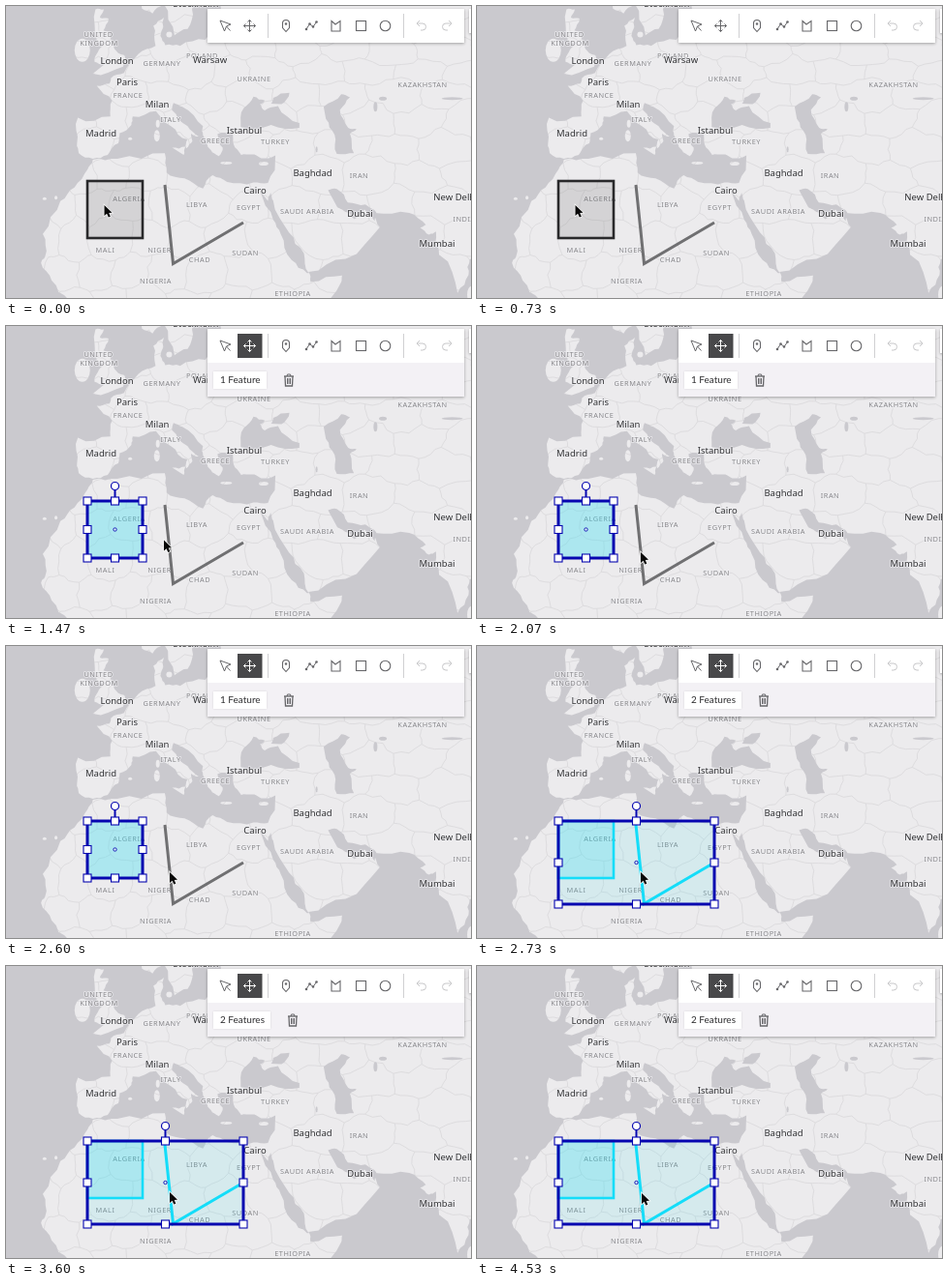
These frames come from a looping animation (480 px wide and 302 px high, 4590 ms). An HTML page with a canvas:

```html
<!DOCTYPE html>
<html lang="en">
<head>
<meta charset="utf-8">
<title>Map sketch selection</title>
<style>
html, body { margin: 0; width: 100%; height: 100%; overflow: hidden; background: #cac9ce; }
canvas { display: block; width: 480px; height: 302px; }
</style>
</head>
<body>
<canvas id="stage" width="480" height="302"></canvas>
<script>
const W = 480, H = 302, LOOP = 4590;
const LAND = '#ecebed', WATER = '#cac9ce', BORDER = '#d9d8db';
const NAVY = '#0606b0', CYAN = '#0fdcfa', INK = '#67676a';
const PICKED = 1000, ADDED = 2670;

// Key points of the coasts, lon and lat; roughen() adds the detail
const atlantic = [30,60, 23.5,59, 24.3,57.3, 21.6,57.4, 20,54.8, 14.3,54, 10.9,54.1, 9.8,55.3, 10.6,57.6, 8.2,56.6,
  8.7,54, 4.8,52.9, 1.5,50.2, -1.5,49.4, -1.8,48.6, -4.7,48.3, -1.2,46, -1.6,43.4, -9,43.2, -9.2,38.8, -8.8,37, -5.6,36];
const mediterranean = [-2.2,36.7, .2,38.8, .5,40.6, 3.2,42, 3.5,43.4, 8.8,44.3, 12.2,41.8, 16,39.5, 15.7,37.9, 17.1,39.2,
  16.8,40.5, 18.5,40, 16,41.8, 12.4,44.5, 12.8,45.6, 14.8,45, 19.5,41.8, 19.5,40.2, 21.3,37.6, 23.1,36.5, 24,38,
  22.8,40.4, 26.3,40.6, 26.5,38.6, 28.2,36.7, 30.6,36.8, 32.8,36.1, 36,36.6, 34.3,31.4, 31,31.5, 25,31.6, 21.7,32.9,
  19.5,30.3, 15.3,32.3, 11.2,33.4, 10.8,37, 0,36, -5.6,35.8];
const south = [-6.8,34, -9.8,30.5, -13,27.8, -17,21, -16.5,16, -17.4,14.7, -15,10.8, -11,6.3, -8,3, 46,3, 51,10.4,
  51.2,11.9, 44,10.5, 43.5,12.7, 52,15.6, 59.8,22.4, 58.6,25.4, 66.5,25.4, 70.3,22.9, 69,22.3, 71,20.8, 72.6,21.5,
  73.3,16.5, 77.5,8, 80,12, 80.3,15.5, 90,20, 90,65];
const britain = [-5.6,50.1, 1.3,51.1, 1.7,52.6, .2,53, -2,55.8, -3.2,56, -2,57.5, -4,57.6, -3.1,58.6, -5,58.6, -4.8,54.9,
  -3,54.2, -4.4,53.2, -5.2,51.8, -3,51.4];
const sweden = [5,62, 5.6,58.7, 8,58.1, 10.5,59.3, 13,55.4, 16,56.2, 17,58.6, 19,62];
const sicily = [12.5,38, 15.5,38.2, 15.1,36.7];
const blackSea = [28.1,41.6, 28.8,44.8, 31,46.6, 33.6,46, 32.5,45.4, 33.6,44.4, 36.6,45.1, 41.5,42.3, 41.5,41.5, 35,42, 31.3,41.2];
const azov = [35,45.5, 35.5,46.4, 39.2,47.2, 37.4,45.4];
const caspian = [47,45, 51,47, 53,46.5, 50.7,44.5, 52.6,41.5, 54.5,41.3, 53,40.5, 53.9,37, 50,36.9, 49.5,40.3, 47.5,43];
const redSea = [32.5,29.9, 35.5,24, 37.2,21, 39.7,15.3, 43.2,12.4, 43.6,12.4, 42.5,16.8, 39.1,21.3, 35.5,27.9, 34.9,29.5, 34.3,27.8];
const gulf = [48,30, 50,30.2, 52.5,27.5, 56.5,27.1, 59,25.5, 58.6,23.7, 56.3,26.1, 54,24.1, 51.2,26.1, 50.1,26.6];

// Small ovals: lon, lat, radii in pixels
const isles = [[-8, 53.4, 8, 12], [9, 40.1, 3, 6], [9.2, 42.2, 2, 4], [24.8, 35.2, 6, 1.5], [33.3, 35.1, 5, 2],
  [2.9, 39.6, 2, 1.5], [-16.6, 28.3, 2, 1.5], [-14, 28.5, 1.5, 2], [80.8, 7.6, 5, 9], [11.8, 55.5, 3, 3]];
const lakes = [[28, 40.7, 5, 1.5], [58.8, 45, 2, 5], [60.5, 46.3, 4, 2], [76.3, 46.3, 11, 1.5], [45.4, 37.7, 1, 3]];

const countries = [
  ['UNITED', 95.5, 30], ['KINGDOM', 96, 38.5], ['GERMANY', 161, 60], ['POLAND', 202.5, 52], ['FRANCE', 126, 93],
  ['UKRAINE', 256, 76], ['KAZAKHSTAN', 430, 82], ['ITALY', 170, 118], ['GREECE', 216, 140], ['TURKEY', 278, 140.5],
  ['IRAN', 364.5, 176], ['ALGERIA', 127, 200], ['LIBYA', 197, 206], ['EGYPT', 250.5, 208.5], ['SAUDI ARABIA', 311, 213],
  ['MALI', 102.5, 253], ['NIGER', 158.5, 252.5], ['CHAD', 200, 262.5], ['SUDAN', 247, 256], ['NIGERIA', 154.5, 285],
  ['ETHIOPIA', 296, 298], ['INDIA', 473, 221]
];
const cities = [
  ['London', 114.5, 57], ['Paris', 125, 79.5], ['Milan', 156, 102], ['Madrid', 98, 132.5], ['Warsaw', 210.5, 56],
  ['Istanbul', 246, 129.5], ['Baghdad', 316.5, 173.5], ['Cairo', 257, 191], ['Dubai', 365.5, 215.5], ['Mumbai', 445, 246],
  ['New Delhi', 464, 198], ['Stockholm', 196, -2]
];

const stage = document.getElementById('stage').getContext('2d');
let g = stage;

let seed = 7;
function jitter(size) {
  seed = seed * 16807 % 2147483647;
  return (seed / 2147483647 - 0.5) * 2 * size;
}
function project(lon, lat) {
  return [115 + 4.53 * lon, 333 - 259.6 * Math.log(Math.tan(Math.PI / 4 + lat * Math.PI / 360))];
}
function coast(flat) {
  const pts = [];
  for (let i = 0; i < flat.length; i += 2) pts.push(project(flat[i], flat[i + 1]));
  return roughen(pts, 0.13, 2);
}
// Moves the middle of every segment sideways, then repeats
function roughen(pts, amount, depth) {
  if (!depth) return pts;
  const out = [pts[0]];
  for (let i = 1; i < pts.length; i++) {
    const [x0, y0] = pts[i - 1], [x1, y1] = pts[i], k = jitter(amount);
    out.push([(x0 + x1) / 2 - (y1 - y0) * k, (y0 + y1) / 2 + (x1 - x0) * k], pts[i]);
  }
  return roughen(out, amount, depth - 1);
}

function path(pts, closed) {
  g.beginPath();
  for (const p of pts) g.lineTo(...p);
  if (closed) g.closePath();
}
function line(pts, color, width = 1, closed = false) {
  path(pts, closed);
  g.strokeStyle = color;
  g.lineWidth = width;
  g.stroke();
}
function box(x, y, w, h, fill, stroke, width = 1) {
  if (fill) { g.fillStyle = fill; g.fillRect(x, y, w, h); }
  if (stroke) { g.strokeStyle = stroke; g.lineWidth = width; g.strokeRect(x, y, w, h); }
}
function circle(x, y, r, fill, stroke, width = 1) {
  g.beginPath();
  g.arc(x, y, r, 0, 7);
  if (fill) { g.fillStyle = fill; g.fill(); }
  if (stroke) { g.strokeStyle = stroke; g.lineWidth = width; g.stroke(); }
}
function fillAreas(areas, ovals) {
  g.fillStyle = LAND;
  for (const a of areas) { path(coast(a), true); g.fill(); }
  for (const [lon, lat, rx, ry] of ovals) {
    g.beginPath();
    g.ellipse(...project(lon, lat), rx, ry, 0, 0, 7);
    g.fill();
  }
}

// A loose honeycomb whose cells widen to the south and east
function paintBorders() {
  const nodes = [];
  for (let r = 0; r < 12; r++) {
    nodes.push([]);
    for (let c = 0; c < 22; c++) {
      const sag = (r + c) % 2 ? 4 : -4;
      nodes[r].push([40 + 16 * c + 0.3 * c * c + jitter(5), 12 + 20 * r + 0.8 * r * r + sag + jitter(5)]);
    }
  }
  for (let r = 0; r < 11; r++)
    for (let c = 0; c < 21; c++) {
      line(roughen([nodes[r][c], nodes[r][c + 1]], 0.15, 2), BORDER, 0.8);
      if ((r + c) % 2) line(roughen([nodes[r][c], nodes[r + 1][c]], 0.15, 2), BORDER, 0.8);
    }
}

function paintMap() {
  const sheet = document.createElement('canvas');
  sheet.width = W; sheet.height = H;
  g = sheet.getContext('2d');
  g.lineJoin = 'round';
  fillAreas([[...atlantic, ...mediterranean, ...south], britain, sweden, sicily], isles);
  g.globalCompositeOperation = 'source-atop';
  paintBorders();
  g.globalCompositeOperation = 'destination-out';
  fillAreas([blackSea, azov, caspian, redSea, gulf], lakes);
  g.globalCompositeOperation = 'destination-over';
  box(0, 0, W, H, WATER);
  g.globalCompositeOperation = 'source-over';

  g.textAlign = 'center';
  g.textBaseline = 'middle';
  g.font = '7.4px "Noto Sans", sans-serif';
  g.letterSpacing = '0.5px';
  for (const place of countries) label(...place, '#88878a');
  g.font = '9.5px "Noto Sans", sans-serif';
  g.letterSpacing = '0px';
  for (const place of cities) label(...place, '#303032');
  g = stage;
  return sheet;
}
function label(text, x, y, color) {
  g.strokeStyle = 'rgba(240,239,242,.65)';
  g.lineWidth = 2;
  g.strokeText(text, x, y);
  g.fillStyle = color;
  g.fillText(text, x, y);
}

const vee = [[164, 185], [172.5, 266.5], [245, 224]];

function frame(x0, y0, x1, y1, fill) {
  const mx = (x0 + x1) / 2, my = (y0 + y1) / 2;
  box(x0, y0, x1 - x0, y1 - y0, fill, NAVY, 3);
  line([[mx, y0], [mx, 169]], NAVY, 2);
  circle(mx, 165.5, 4, '#fff', NAVY, 1.2);
  circle(mx, my, 1.7, '#d8f2f8', NAVY, 0.9);
  for (const x of [x0, mx, x1])
    for (const y of [y0, my, y1])
      if (x !== mx || y !== my) box(x - 4, y - 4, 8, 8, '#fff', NAVY, 1.1);
}

function drawShapes(t) {
  if (t < ADDED) line(vee, '#707072', 3);
  if (t < PICKED) {
    box(84, 181, 57, 59, 'rgba(90,90,90,.16)', '#29292b', 2.6);
  } else if (t < ADDED) {
    frame(84, 181, 141, 240, 'rgba(60,222,240,.36)');
  } else {
    box(84, 181, 57, 59, 'rgba(0,218,245,.2)', CYAN, 2.6);
    line(vee, CYAN, 3);
    frame(84, 181, 245, 267, 'rgba(60,220,235,.13)');
  }
}

function moveIcon(color) {
  line([[245.5, 20.5], [257.5, 20.5]], color);
  line([[251.5, 14.5], [251.5, 26.5]], color);
  for (const [dx, dy] of [[1, 0], [-1, 0], [0, 1], [0, -1]]) {
    const x = 251.5 + dx * 4, y = 20.5 + dy * 4;
    line([[x + dy * 2, y + dx * 2], [x + dx * 2, y + dy * 2], [x - dy * 2, y - dx * 2]], color);
  }
}
function pinIcon() {
  g.beginPath();
  g.arc(289, 18, 3.5, Math.PI, 0);
  g.lineTo(292.5, 22.5);
  g.lineTo(289, 26.5);
  g.lineTo(285.5, 22.5);
  g.closePath();
  g.strokeStyle = INK;
  g.lineWidth = 1.1;
  g.stroke();
  circle(289, 18.5, 1.2, INK);
}
function turnIcon(x, dir) {
  g.save();
  g.translate(x, 20);
  g.scale(dir, 1);
  line([[-2, -5], [-5, -2], [-2, 1]], '#c8c8ca');
  g.beginPath();
  g.moveTo(-5, -2);
  g.lineTo(1, -2);
  g.arc(1, 1.5, 3.5, -Math.PI / 2, Math.PI / 2);
  g.lineTo(-1, 5);
  g.stroke();
  g.restore();
}
function trashIcon(x) {
  line([[x - 5, 52], [x + 5, 52]], INK, 1.3);
  line([[x - 2, 52], [x - 1.5, 50], [x + 1.5, 50], [x + 2, 52]], INK);
  line([[x - 4, 52], [x - 3.5, 62], [x + 3.5, 62], [x + 4, 52]], INK, 1.3);
  for (const dx of [-1.5, 0, 1.5]) line([[x + dx, 54], [x + dx, 60]], INK);
}

const fade = (t, start) => Math.min(1, Math.max(0, (t - start) / 200));

function drawToolbar(t) {
  const open = t >= PICKED;
  g.save();
  g.shadowColor = 'rgba(0,0,0,.32)';
  g.shadowBlur = 3;
  g.shadowOffsetY = 1;
  box(208, 3, 265, open ? 70 : 35, '#fff');
  box(478, 3, 10, 25, '#fff');
  g.restore();

  line([[221, 15], [232, 19], [227.5, 21], [225.5, 26]], INK, 1, true);
  line([[227.5, 21], [231.5, 25.5]], INK);
  if (open) {
    g.globalAlpha = fade(t, 1030);
    box(239, 8, 25.5, 25, '#48484a');
    moveIcon('#fff');
    g.globalAlpha = 1;
  } else {
    moveIcon(INK);
  }
  for (const x of [270.5, 410.5]) line([[x, 8], [x, 33]], '#d0d0d2');

  pinIcon();
  const zig = [[310, 24], [313.5, 18.5], [317, 21.5], [320.5, 16.5]];
  line(zig, INK);
  for (const [x, y] of zig) circle(x, y, 1.3, INK);
  line([[336, 15.5], [340, 19], [345, 15.5], [345, 26], [336, 26]], INK, 1.1, true);
  box(361.5, 15.5, 10, 10, null, INK, 1.1);
  circle(391.5, 20.5, 5.3, null, INK, 1.1);
  turnIcon(429, 1);
  turnIcon(455, -1);
  if (open) drawActions(t);
}

function drawActions(t) {
  const two = t >= ADDED, grow = two ? 4 : 0;
  g.save();
  g.globalAlpha = fade(t, 1070);
  box(208, 38, 265, 35, '#f3f1f5');
  g.save();
  g.shadowColor = 'rgba(0,0,0,.12)';
  g.shadowBlur = 2;
  box(214, 47, 55 + grow, 18, '#fff');
  g.restore();
  g.font = '10px Lato, sans-serif';
  g.textBaseline = 'middle';
  g.fillStyle = '#2e2e30';
  g.fillText(two ? '2 Features' : '1 Feature', 221, 56);
  trashIcon(292 + grow);
  g.restore();
}

// Cursor stops: time, x, y
const stops = [[0, 101.5, 206], [1130, 101.5, 206], [1470, 163, 221.5], [1670, 169, 234], [4450, 169, 234], [4530, 170, 235], [LOOP, 170, 235]];
function cursorAt(t) {
  const i = Math.max(1, stops.findIndex(s => s[0] > t));
  const [t0, x0, y0] = stops[i - 1], [t1, x1, y1] = stops[i];
  const p = (t - t0) / (t1 - t0), e = p * p * (3 - 2 * p);
  return [x0 + (x1 - x0) * e, y0 + (y1 - y0) * e];
}
function drawCursor(x, y) {
  g.save();
  g.translate(x, y);
  line([[0, 0], [0, 11], [2.6, 8.8], [4.3, 12.6], [6.3, 11.7], [4.7, 8], [8, 7.8]], '#f4f4f4', 1.6, true);
  g.fillStyle = '#080808';
  g.fill();
  g.restore();
}
function drawRipple(t, start, x, y) {
  const p = (t - start) / 200;
  if (p < 0 || p >= 1) return;
  g.globalAlpha = 0.5 * (1 - p);
  circle(x, y, 7 + 11 * p, 'rgba(70,70,70,.35)', '#555', 1.5);
  g.globalAlpha = 1;
}

const map = paintMap();
const begin = performance.now();

function draw(now) {
  const t = Math.max(0, now - begin) % LOOP;
  g.drawImage(map, 0, 0);
  drawShapes(t);
  drawToolbar(t);
  drawRipple(t, 530, 101.5, 208.5);
  drawRipple(t, 2130, 169, 235.5);
  drawCursor(...cursorAt(t));
  requestAnimationFrame(draw);
}
draw(begin);
</script>
</body>
</html>
```
